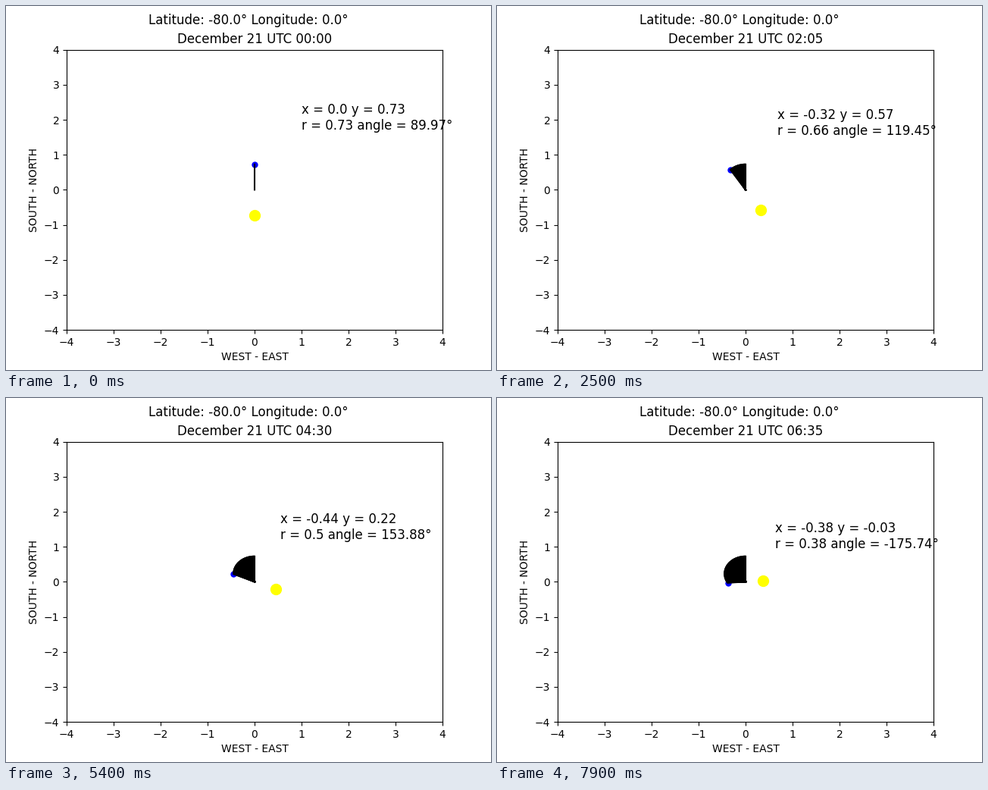
Write a matplotlib script that moves like this. It is 640 px wide and 480 px high and loops after 8000 ms.

```python
import math

import matplotlib.pyplot as plt
from matplotlib.animation import FuncAnimation

LAT, LON = -80.0, 0.0
DECL = math.radians(-23.44)
FRAMES, INTERVAL = 80, 100
STEP_MIN = 5


def shadow(minutes):
    """Tip of the shadow (east, north) of a stick cos(LAT) high."""
    hours = minutes / 60
    # mean hour angle from midnight, with a small equation-of-time drift
    h = math.radians(15 * hours - 0.036 - 0.0028 * hours)
    lat = math.radians(LAT)
    east = math.cos(DECL) * math.sin(h)
    north = (math.cos(lat) * math.sin(DECL)
             + math.sin(lat) * math.cos(DECL) * math.cos(h))
    up = (math.sin(lat) * math.sin(DECL)
          - math.cos(lat) * math.cos(DECL) * math.cos(h))
    scale = -math.cos(lat) / up
    return scale * east, scale * north


tips = [shadow(i * STEP_MIN) for i in range(FRAMES)]

fig, ax = plt.subplots(figsize=(6.4, 4.8), dpi=100)
fig.suptitle(f"Latitude: {LAT}° Longitude: {LON}°", fontsize=12)
ax.set(xlim=(-4, 4), ylim=(-4, 4), xlabel="WEST - EAST", ylabel="SOUTH - NORTH")
title = ax.set_title("", fontsize=12)

sun, = ax.plot([], [], "o", color="yellow", markersize=10)
tip, = ax.plot([], [], "o", color="blue", markersize=5)
rays = [ax.plot([0, x], [0, y], color="black")[0] for x, y in tips]
label = ax.text(0, 0, "", fontsize=12)


def update(i):
    x, y = tips[i]
    hour, minute = divmod(i * STEP_MIN, 60)
    title.set_text(f"December 21 UTC {hour:02d}:{minute:02d}")
    sun.set_data([-x], [-y])
    tip.set_data([x], [y])
    for k, ray in enumerate(rays):
        ray.set_visible(k <= i)
    r = math.hypot(x, y)
    angle = math.degrees(math.atan2(y, x))
    label.set_position((x + 1, y + 1))
    label.set_text(f"x = {round(x, 2)} y = {round(y, 2)}\n"
                   f"r = {round(r, 2)} angle = {round(angle, 2)}°")
    return [title, sun, tip, label, *rays]


anim = FuncAnimation(fig, update, frames=FRAMES, interval=INTERVAL,
                     repeat=True, repeat_delay=0, blit=False)
plt.show()
```
